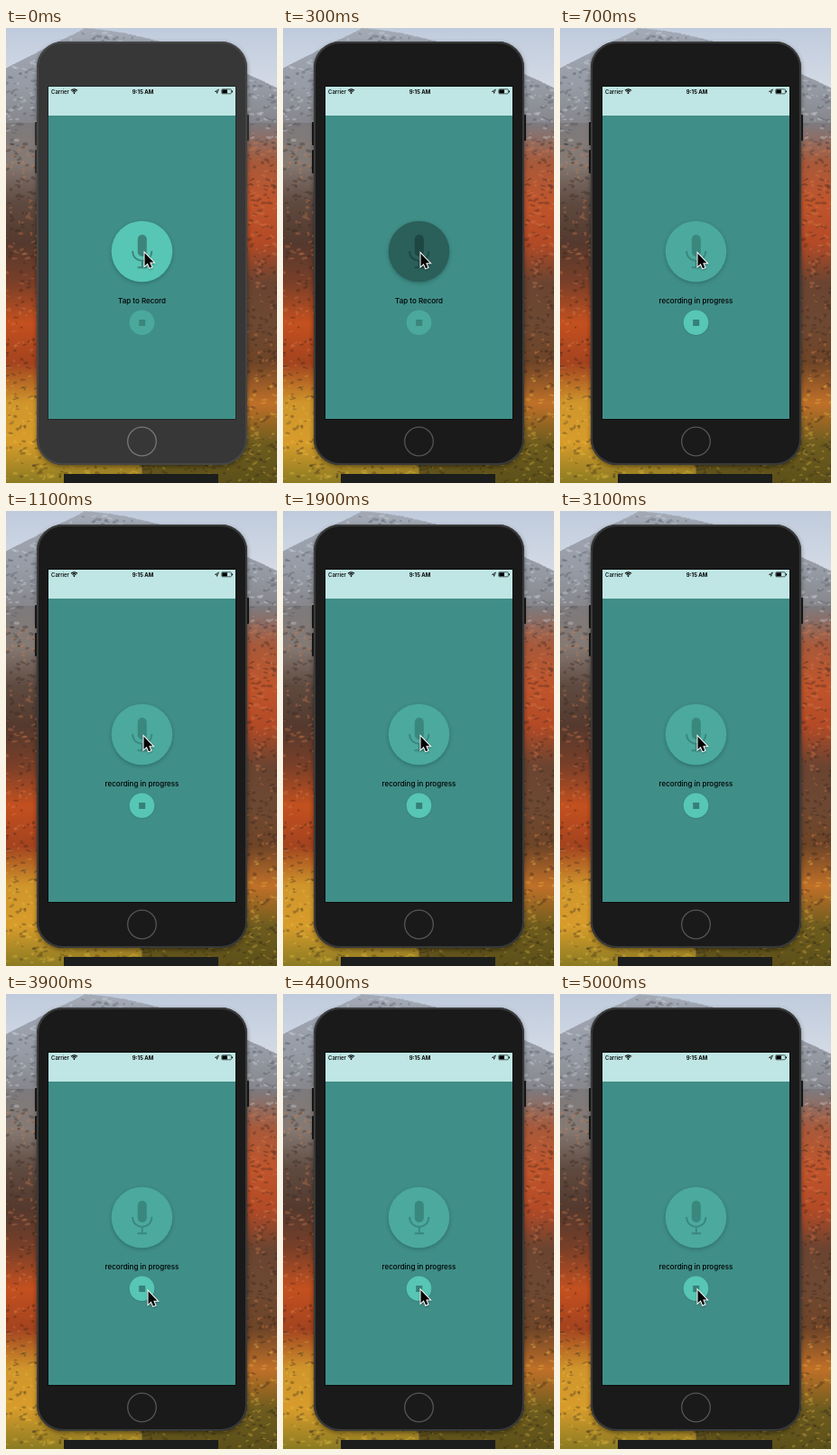
An HTML page with a canvas that plays this animation: 300 by 504 pixels, repeating every 5.1 s.

```html
<!DOCTYPE html>
<html lang="en">
<head>
<meta charset="utf-8">
<title>Voice recorder</title>
<style>
  html, body { margin: 0; width: 100%; height: 100%; overflow: hidden; background: #888; }
  canvas { display: block; width: 300px; height: 504px; }
</style>
</head>
<body>
<canvas id="stage" width="300" height="504"></canvas>
<script>
const W = 300, H = 504, LOOP = 5100, CENTER = 150.5;
const INK = '#000';
const ctx = document.getElementById('stage').getContext('2d');

function rect(x, y, w, h, fill, r = 0) {
  ctx.beginPath();
  ctx.roundRect(x, y, w, h, r);
  ctx.fillStyle = fill;
  ctx.fill();
}

function outline(x, y, w, h, color, width, r = 0) {
  ctx.beginPath();
  ctx.roundRect(x, y, w, h, r);
  ctx.strokeStyle = color;
  ctx.lineWidth = width;
  ctx.stroke();
}

function disc(x, y, r, fill) {
  ctx.beginPath();
  ctx.arc(x, y, r, 0, Math.PI * 2);
  ctx.fillStyle = fill;
  ctx.fill();
}

function withShadow(color, blur, offset, paint) {
  ctx.save();
  ctx.shadowColor = color;
  ctx.shadowBlur = blur;
  ctx.shadowOffsetY = offset;
  paint();
  ctx.restore();
}

function text(str, x, y, font, align = 'center') {
  ctx.font = `${font} Inter, sans-serif`;
  ctx.textAlign = align;
  ctx.fillStyle = INK;
  ctx.fillText(str, x, y);
}

function seeded(seed) {
  return () => {
    seed = (seed * 1664525 + 1013904223) >>> 0;
    return seed / 4294967296;
  };
}

// Height of the mountain skyline at x
function ridge(x) {
  return x < 87 ? 44 * (1 - x / 87) : 0.0124 * (x - 87) ** 1.6;
}

// Soft autumn mountainside, painted once
function paintLandscape() {
  const layer = document.createElement('canvas');
  layer.width = W;
  layer.height = H;
  const c = layer.getContext('2d');
  const rand = seeded(17);

  const gradient = (y0, y1, colors) => {
    const g = c.createLinearGradient(0, y0, 0, y1);
    colors.forEach((color, i) => g.addColorStop(i / (colors.length - 1), color));
    return g;
  };

  c.fillStyle = gradient(0, 70, ['#bfcbdc', '#d5dbe6']);
  c.fillRect(0, 0, W, H);

  c.beginPath();
  for (let x = 0; x <= W; x++) c.lineTo(x, ridge(x) + rand());
  c.lineTo(W, H);
  c.lineTo(0, H);
  c.fillStyle = gradient(0, 130, ['#a3aab6', '#969ba5', '#7d7a7c']);
  c.fill();

  const left = ['#7d7a7c', '#857a74', '#5f4a40', '#54392e', '#7a3f28',
                '#c4501f', '#a3431f', '#d0962c', '#d79c2b', '#8a7a22'];
  const right = ['#7c7b80', '#a8593a', '#c0552c', '#b34a26', '#6a4431',
                 '#6d4832', '#6f4527', '#c07028', '#6e5c1e', '#5c5019'];
  c.fillStyle = gradient(105, H, left);
  c.fillRect(0, 105, CENTER, H);
  c.fillStyle = gradient(105, H, right);
  c.fillRect(CENTER, 105, CENTER, H);

  // Snow, rock and foliage: light and dark dabs over the slope
  for (let i = 0; i < 3000; i++) {
    const x = rand() * W;
    const top = ridge(x) + 3;
    const y = top + rand() * (H - top);
    const light = y < 125 ? '#dfe4ec' : y < 385 ? '#dc8250' : '#ecc04a';
    const dark = y < 125 ? '#454b57' : '#30211a';
    c.globalAlpha = 0.3;
    c.fillStyle = rand() < 0.45 ? light : dark;
    c.beginPath();
    c.ellipse(x, y, 1 + rand() * 2.5, 0.6 + rand() * 1.2, rand() - 0.5, 0, Math.PI * 2);
    c.fill();
  }
  return layer;
}

const landscape = paintLandscape();

function drawPhone(active) {
  const body = active ? '#1a1a1a' : '#373737';
  rect(64, 494, 171, 10, '#1c1d1d');
  rect(32, 104, 3, 26, body, 1);
  rect(32, 135, 3, 26, body, 1);
  rect(266, 96, 3, 29, body, 1);

  withShadow('rgba(0,0,0,.45)', 5, 2, () => rect(34, 15, 233, 469, body, 29));
  outline(35, 16, 231, 467, active ? '#393a3a' : '#454646', 2, 28);
  outline(CENTER - 15.8, 458 - 15.8, 31.6, 31.6, active ? '#555' : '#777', 1.3, 15.8);

  outline(46.5, 64.5, 208, 369, active ? '#0c0c0c' : '#242626', 1);
  rect(47, 65, 207, 368, '#408e88');
}

function drawStatusBar() {
  rect(47, 65, 207, 32, '#bfe6e4');
  text('Carrier', 50, 72.5, '500 6px', 'left');
  text('9:15 AM', 151.5, 72.5, '700 6px');

  ctx.strokeStyle = INK;
  ctx.lineWidth = 1.2;
  for (const r of [4.8, 2.8]) {
    ctx.beginPath();
    ctx.arc(75.5, 72.6, r, Math.PI * 1.25, Math.PI * 1.75);
    ctx.stroke();
  }
  disc(75.5, 72, 0.9, INK);

  ctx.lineWidth = 0.7;
  ctx.beginPath();
  ctx.moveTo(231.5, 70.4);
  ctx.lineTo(235.4, 68);
  ctx.lineTo(233.6, 72.4);
  ctx.lineTo(233.4, 70.5);
  ctx.closePath();
  ctx.stroke();

  outline(238.8, 67.8, 10.6, 5, INK, 0.6, 1);
  rect(239.3, 68.3, 5.7, 4, INK);
  rect(250, 69.4, 1, 1.9, INK);
}

function drawMic(fill, icon) {
  withShadow('rgba(0,40,38,.3)', 4, 1.5, () => disc(CENTER, 247.5, 33.8, fill));
  rect(145.8, 229, 10, 24, icon, 5);
  ctx.strokeStyle = icon;
  ctx.lineWidth = 1.9;
  ctx.beginPath();
  ctx.moveTo(140.2, 247);
  ctx.bezierCurveTo(140.2, 261.5, 161.3, 261.5, 161.3, 247);
  ctx.moveTo(150.8, 258);
  ctx.lineTo(150.8, 265);
  ctx.moveTo(145.7, 265.2);
  ctx.lineTo(156, 265.2);
  ctx.stroke();
}

function drawStop(enabled) {
  const shade = enabled ? 'rgba(0,40,38,.2)' : 'transparent';
  withShadow(shade, 2, 0.5, () => disc(CENTER, 326.3, 13.8, enabled ? '#57c6b4' : '#4ba99c'));
  rect(147.2, 323, 7, 7, enabled ? '#358077' : '#3a857c');
}

function drawCursor(x, y) {
  const arrow = new Path2D('M.5 .8V15L3.8 12 6 17.3 8.4 16.3 6.2 11.2H10.5Z');
  ctx.save();
  ctx.translate(x, y);
  ctx.strokeStyle = '#fff';
  ctx.lineWidth = 2;
  withShadow('rgba(0,0,0,.35)', 2, 1, () => ctx.stroke(arrow));
  ctx.fillStyle = '#050505';
  ctx.fill(arrow);
  ctx.restore();
}

function ease(t, start, end) {
  const p = Math.min(1, Math.max(0, (t - start) / (end - start)));
  return p * p * (3 - 2 * p);
}

function cursorAt(t) {
  const settle = ease(t, 0, 100);
  const toStop = ease(t, 3300, 3800);
  const onStop = ease(t, 3900, 4300);
  return [
    153 - settle + 5 * toStop - 5 * onStop,
    248.4 + 0.6 * settle + 79.5 * toStop - 1.2 * onStop
  ];
}

function draw(t) {
  const active = t >= 100;
  const recording = t >= 600;

  ctx.drawImage(landscape, 0, 0);
  drawPhone(active);
  drawStatusBar();

  if (recording) drawMic('#4ba99d', '#3a877e');
  else if (active) drawMic('#2b5f59', '#1e4743');
  else drawMic('#57c6b4', '#3d847b');

  text(recording ? 'recording in progress' : 'Tap to Record', CENTER, 305, '500 8px');
  drawStop(recording);
  drawCursor(...cursorAt(t));
}

function tick() {
  draw(performance.now() % LOOP);
  requestAnimationFrame(tick);
}
tick();
</script>
</body>
</html>
```
